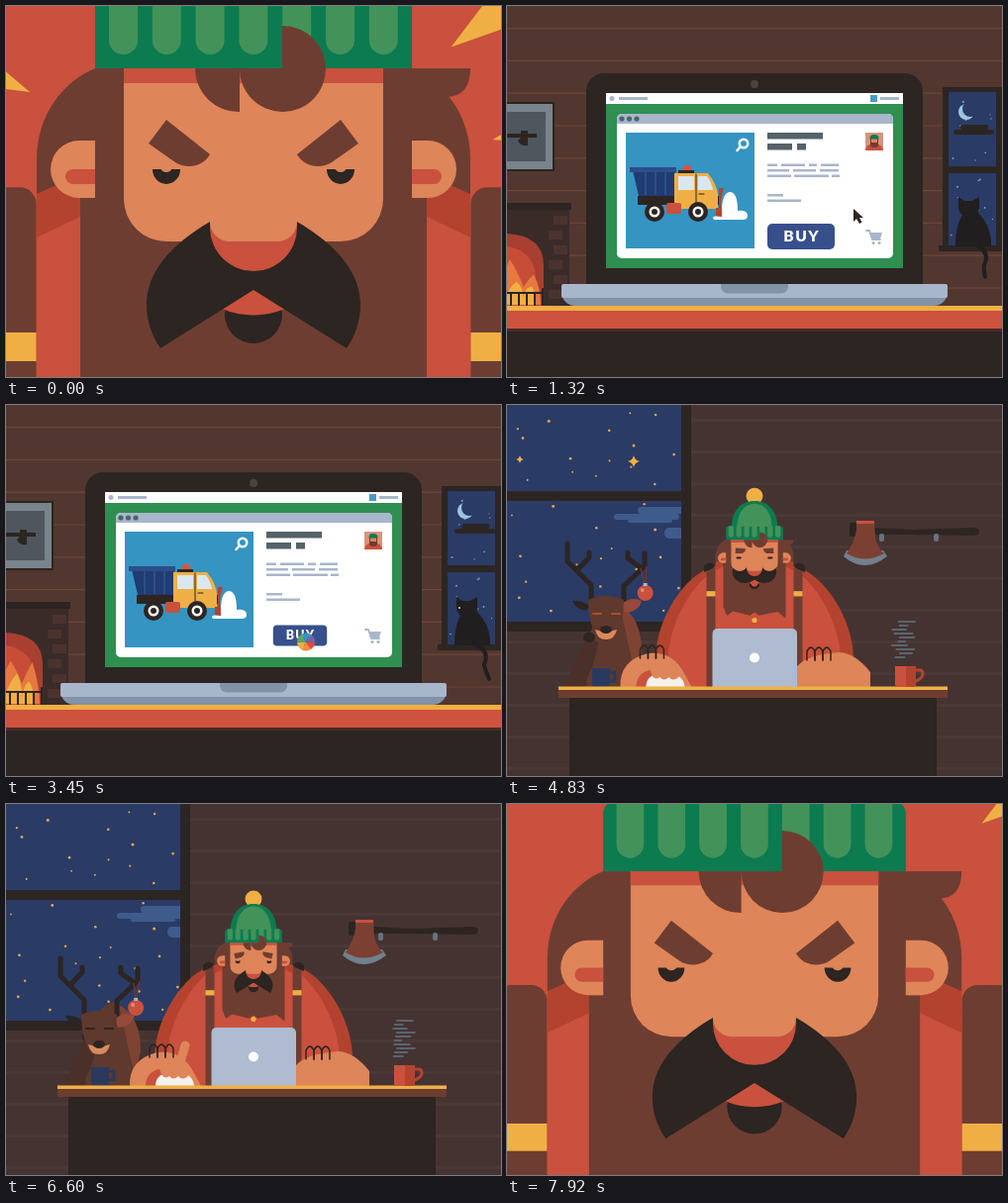
Animation, 500 px wide and 375 px high, one loop 7950 ms. Source, as an HTML page with a canvas:

```html
<!DOCTYPE html>
<html lang="en">
<head>
<meta charset="utf-8">
<title>Impatient lumberjack</title>
<style>
html, body { margin: 0; width: 100%; height: 100%; overflow: hidden; background: #2e2623; }
canvas { display: block; width: 100vw; height: 100vh; }
</style>
</head>
<body>
<canvas id="stage" width="500" height="375"></canvas>
<script>
const LOOP = 7950, STEP = 30, LAPTOP_AT = 1200, DESK_AT = 4290, ZOOM_AT = -219;
const g = document.getElementById('stage').getContext('2d');
const RED = '#c9513d', DARK_RED = '#b3432f', SKIN = '#de8559', HAIR = '#6e3d31', INK = '#2c2522',
  GOLD = '#f0af45', PINE = '#0c7b4f', GREEN = '#43925a', STEEL = '#a8b6cb', NAVY = '#2a3b66', WHITE = '#fff';

const fill = (c, d) => { g.fillStyle = c; g.fill(new Path2D(d)); };
const line = (c, w, d) => {
  g.strokeStyle = c; g.lineWidth = w; g.lineCap = g.lineJoin = 'round';
  g.stroke(new Path2D(d));
};
const box = (c, x, y, w, h, r = 0) => {
  g.fillStyle = c; g.beginPath(); g.roundRect(x, y, w, h, r); g.fill();
};
const dot = (c, x, y, r, ry = r) => {
  g.fillStyle = c; g.beginPath(); g.ellipse(x, y, r, ry, 0, 0, 7); g.fill();
};
const group = (draw, x = 0, y = 0, s = 1, a = 0) => {
  g.save(); g.translate(x, y); g.rotate(a); g.scale(s, s); draw(); g.restore();
};
const both = draw => {
  draw();
  g.save(); g.translate(500, 0); g.scale(-1, 1); draw(); g.restore();
};
// Smooth progress from 0 to 1 between two times
const ramp = (t, a, b) => {
  const p = Math.min(1, Math.max(0, (t - a) / (b - a)));
  return p * p * (3 - 2 * p);
};
const random = seed => () => (seed = seed * 16807 % 2147483647) / 2147483647;

// Stars scattered one per grid cell
function stars(seed, cols, rows, x, y, w, h, c, size) {
  const rnd = random(seed * 99991), cw = w / cols, ch = h / rows;
  for (let i = 0; i < cols * rows; i++)
    dot(c, x + (i % cols + rnd()) * cw, y + (Math.floor(i / cols) + rnd()) * ch, size * (.7 + .5 * rnd()));
}

// ---- Lumberjack ----
function eye(mood) {
  if (mood === 'happy') return line(INK, 11, 'M153 164H171');
  fill(INK, 'M148 165H176A14 15 0 0 1 148 165Z');
  fill(SKIN, 'M156 164H168Q166 168 162 168T156 164Z');
}

function brow(mood) {
  const shape = () => fill(HAIR, 'M-13 -24L31 11C24 24 7 26 -4 19L-31 0Z');
  if (mood === 'angry') group(shape, 175, 139);
  else if (mood === 'happy') group(shape, 168, 122, 1, -.6);
  else group(shape, 168, 130, 1, -.85);
}

function moustache(mood) {
  if (mood === 'happy')
    fill(INK, 'M206 218C185 250 150 245 132 222C112 262 150 312 200 306Q232 302 250 287' +
      'Q268 302 300 306C350 312 388 262 368 222C350 245 315 250 294 218Z');
  else
    fill(INK, 'M206 218C165 242 142 270 142 302C142 318 147 333 156 346L250 287L344 346' +
      'C353 333 358 318 358 302C358 270 335 242 294 218Z');
}

function head(mood) {
  both(() => {
    fill(HAIR, 'M120 63H90C58 76 31 110 31 155V190H120Z');
    fill(DARK_RED, 'M31 190L75 170V213L31 234Z');
  });
  fill(HAIR, 'M410 63H469Q469 92 444 92H410Z');
  fill(HAIR, 'M90 63H410V194H425V505L380 468L275 488L250 470L225 488L130 465L95 490L75 440V194H90Z');
  both(() => {
    box(SKIN, 45, 136, 45, 58, [29, 0, 0, 29]);
    box(RED, 60, 165, 30, 15, [7.5, 0, 0, 7.5]);
  });
  box(SKIN, 119, 63, 262, 175, [0, 0, 43, 43]);
  box(RED, 119, 63, 262, 15);

  dot(GOLD, 250, -182, 47);
  fill(PINE, 'M120 0C120 -100 175 -155 250 -155S380 -100 380 0Z');
  fill(GREEN, 'M152 0C152 -90 195 -140 250 -140S348 -90 348 0Z');
  box(PINE, 90, -12, 320, 75, [14, 14, 0, 0]);
  for (let i = 0; i < 7; i++) box(GREEN, 104 + i * 43.8, -14, 29, 63, [0, 0, 14.5, 14.5]);
  fill(HAIR, 'M191 63H236V107A44 44 0 0 1 191 63Z');
  fill(HAIR, 'M279 63V20A43.5 43.5 0 1 1 236 63Z');

  both(() => { brow(mood); eye(mood); });
  dot(INK, 250, 312, 29);
  fill(RED, 'M218 306L250 284L282 306Q250 319 218 306Z');
  if (mood === 'happy') fill(RED, 'M230 306H270Q266 326 250 326T230 306Z');
  moustache(mood);
  fill(RED, 'M206 214H294V224A44 44 0 0 1 206 224Z');
  box(SKIN, 206, 190, 88, 48, [0, 0, 20, 20]);
}

function armHair(x, y) {
  for (let i = 0; i < 3; i++)
    line(INK, 1.5, `M${x + i * 8} ${y + 13}V${y + 4}Q${x + i * 8 + 4} ${y - 4} ${x + i * 8 + 8} ${y + 4}V${y + 13}`);
}

function mouseArm(t) {
  const settle = ramp(t, 5100, 5700);
  const shift = 10 * settle + 2 * Math.sin(t / 260) * (1 - settle);
  const tap = t > 5700 ? .5 + .5 * Math.cos((t - 6600) / 300 * 2 * Math.PI) : 0;
  group(() => {
    fill(SKIN, 'M115 285Q114 258 143 251Q168 248 180 272L187 285Z');
    armHair(135, 243);
    fill(RED, 'M131 285Q131 270 148 267L152 273Q142 277 142 285Z');
    fill('#f4f1ee', 'M141 285Q141 271 160 271T180 285Z');
    fill(SKIN, 'M143 263Q158 258 172 269L174 275Q168 280 164 275Q159 280 155 275Q150 279 147 273Z');
    line(SKIN, 9, `M163 268Q167 ${266 - 7 * tap} 171 ${271 - 27 * tap}`);
  }, shift);
}

function man(t, mood, laugh) {
  fill(DARK_RED, 'M150 286V258C150 215 180 172 208 163H292C320 172 350 215 350 258V286Z');
  fill(RED, 'M163 286V258C163 222 186 182 209 167V163H291V167C314 182 337 222 337 258V286Z');
  both(() => {
    box(HAIR, 201.5, 161.8, 9, 124, [2, 3, 0, 0]);
    box(GOLD, 201.5, 188.2, 9, 5.2);
  });
  group(() => { g.translate(-250, -175); head(mood); }, 250, 160.3 + laugh, .18);
  dot(GOLD, 250, 217.5, 2.6);
  fill(SKIN, 'M293 286V264Q304 252 336 250Q352 251 367 270V286Z');
  armHair(303, 245);
  mouseArm(t);
  box('#aebbd0', 207.5, 226, 85.5, 60, [5, 5, 0, 0]);
  dot(WHITE, 250, 255.5, 5);
}

function desk() {
  box(INK, 63, 296, 371, 80);
  box(HAIR, 52, 287, 393, 9);
  box(GOLD, 52, 284.5, 393, 3.5);
}

// ---- Close-up ----
function closeUp(t, T) {
  const scale = (1.158 - .158 * Math.exp(-T / 120)) / .18;
  const tip = [247, 266, 279, 284][((T / STEP) % 4 + 4) % 4];
  box(RED, 0, 0, 500, 375);
  for (const a of [-.63, -.212, 3.558])
    group(() => fill(GOLD, `M${tip} 0L${tip + 150} -45V45Z`), 250, 187, 1, a);
  group(() => {
    g.translate(-250, -160.3);
    man(t, 'angry', 0);
    desk();
  }, 250, 160.3 + 14.7 * Math.min(1, (scale - 1) / 4), scale);
}

// ---- Cabin desk ----
function sparkle(t, x, y, size, at) {
  const r = size * Math.max(0, 1 - Math.abs(t - at) / 260);
  if (r) group(() => fill(GOLD, 'M0 -1Q.2 -.2 1 0Q.2 .2 0 1Q-.2 .2 -1 0Q-.2 -.2 0 -1Z'), x, y, r);
}

function nightWindow(t) {
  box(INK, 0, 0, 186, 229);
  box(NAVY, 0, 0, 176, 87);
  box(NAVY, 0, 97, 176, 122);
  stars(77, 5, 3, 2, 2, 172, 82, '#e0a64c', 1.3);
  stars(41, 5, 4, 2, 100, 172, 116, '#e0a64c', 1.3);
  sparkle(t, 128, 57, 6, 4830);
  sparkle(t, 13, 55, 4, 4850);
  sparkle(t, 35, 38, 5, 6150);
  sparkle(t, 51, 19, 5, 7000);
  g.save();
  g.beginPath(); g.rect(0, 97, 176, 122); g.clip();
  group(() => {
    box('#3f5b8c', 132, 103, 60, 7, 3.5);
    box('#3f5b8c', 108, 110, 66, 6, 3);
    box('#3f5b8c', 122, 115, 45, 4, 2);
    box('#3f5b8c', 159, 124, 40, 11, 5);
  }, (t - 4830) / 440);
  g.restore();
}

function deer(t) {
  const nod = ramp(t, 5250, 6000), fur = '#5f392d';
  fill(fur, 'M80 286L84 232Q90 206 108 200Q134 210 136 250L126 286Z');
  fill('#7f4333', 'M114 203Q136 214 136 250L130 274Q122 240 114 203Z');
  fill('#4b3029', 'M58 285L81 234L92 240Q89 264 76 285Z');
  dot(INK, 83, 235, 6, 5);
  group(() => {
    line(INK, 5, 'M85 197V182L61 158V140M83 149V154L71 167M118 197V183L139 163V150M122 149V155L136 165');
    fill(INK, 'M66 198Q74 197 84 203L80 208Q70 207 66 198Z');
    fill('#97493a', 'M116 201Q126 193 136 198Q133 209 119 210Z');
    fill(fur, 'M82 197Q100 189 118 197L117 212Q114 228 108 236Q100 241 92 236Q86 228 83 212Z');
    fill('#d88a5c', 'M89 227L100 230L111 227Q109 237 100 237T89 227Z');
    dot(INK, 100, 227, 6, 4);
    line(nod > .5 ? INK : '#b04b38', 2, 'M87 211H95M106 211H114');
    const sway = 2 * Math.sin(t / 230);
    line('#7a352b', 1.2, `M135 165L${138 + sway} 183L141 163`);
    dot(RED, 138 + sway, 190, 8);
    box(STEEL, 136 + sway, 180, 4, 3);
    dot('#e58670', 135 + sway, 187, 2);
  }, -6 * nod, 16 * nod);
  box('#2a3a5e', 86, 266, 18, 19, [0, 0, 3, 3]);
  line('#2a3a5e', 3, 'M104 270H109V279H104');
}

function axe() {
  box(INK, 346, 119, 10, 14, 2);
  fill(INK, 'M352 123L410 126L470 124Q477 124 477 128T470 132L410 131L352 131Z');
  fill('#70808d', 'M343 147L340 153Q361 171 384 153L380 147Z');
  fill('#7c4033', 'M353 117H371L372 134Q375 146 381 150Q361 161 343 150Q351 139 353 126Z');
  box(RED, 353, 117, 18, 3);
  box('#66727c', 376, 130, 5, 8, 2);
  box('#66727c', 431, 130, 5, 8, 2);
}

function cup(t) {
  for (let i = 0; i < 10; i++) {
    const x = 400 + 4 * Math.sin(i * 1.7 + t / 240), w = 3 + 6 * Math.abs(Math.sin(i * 2.3 + 1));
    line('#59656f', 2, `M${x - w} ${219 + i * 4}H${x + w}`);
  }
  box(RED, 392, 264, 21, 21, [0, 0, 3, 3]);
  box(DARK_RED, 403, 264, 10, 21, [0, 0, 3, 0]);
  line(DARK_RED, 3, 'M413 268H417Q420 268 420 272T413 279');
}

function cabin(t, T) {
  box('#453332', 0, 0, 500, 375);
  for (let y = 14; y < 375; y += 32) box('#4b3937', 0, y, 500, 3);
  nightWindow(t);
  axe();
  deer(t);
  const mood = t < 5400 ? 'happy' : T > -400 ? 'angry' : 'bored';
  const cheer = 1 - ramp(t, 5200, 5600);
  man(t, mood, cheer * (-3 + Math.sin(t / 60)));
  both(() => fill(INK, 'M199 169V163Q204 157 210 162L208 165Z'));
  desk();
  cup(t);
}

// ---- Laptop ----
function picture() {
  box(INK, 0, 97, 48, 70);
  box('#79838c', 0, 99, 46, 66);
  box('#4f565d', 0, 107, 39, 50);
  fill(INK, 'M0 129H14V126H21V141Q13 142 11 136L14 133H0ZM21 129H30V133H21Z');
}

function fireplace(t) {
  box('#3a2b29', 0, 205, 63, 100);
  box(INK, 0, 199, 65, 7);
  for (let i = 0; i < 6; i++) box('#4a332f', i % 2 ? 42 : 47, 212 + i * 15, 14, 9, 1);
  fill('#a93f31', 'M0 230Q37 232 37 262V303H0Z');
  fill('#c84d37', 'M0 243Q28 248 29 275V303H0Z');
  const flame = (c, x, w, h, p) => {
    const lean = 4 * Math.sin(t / 110 + p), top = 302 - h - 6 * Math.sin(t / 140 + p);
    fill(c, `M${x - w} 302Q${x - w} 285 ${x + lean} ${top}Q${x + w} 284 ${x + w} 302Z`);
  };
  flame('#e77840', 5, 15, 46, 0);
  flame('#e77840', 23, 11, 36, 2);
  flame(GOLD, 8, 9, 28, 1);
  flame(GOLD, 22, 6, 19, 3);
  line(INK, 2, 'M0 290H36M4 290V304M12 290V304M20 290V304M28 290V304M36 286V304');
}

function catWindow(t) {
  box(INK, 440, 82, 60, 164);
  box(NAVY, 446, 87, 48, 75);
  box(NAVY, 446, 169, 48, 74);
  stars(19, 3, 3, 448, 90, 44, 68, '#8795bb', .9);
  stars(53, 3, 3, 448, 172, 44, 60, '#8795bb', .9);
  dot('#9ec5de', 464, 107, 8);
  dot(NAVY, 468, 104, 8);
  const drift = (t - 2220) / 900;
  box(INK, 459 + drift, 120, 28, 5, 2.5);
  box(INK, 452 + drift, 125, 41, 5, 2.5);
  box(INK, 436, 242, 64, 6);

  const turn = ramp(t, 2700, 3100), swing = .5 - .5 * Math.cos((t - 2220) / 1230 * Math.PI);
  fill('#211e20', 'M453 243Q453 216 464 207H474Q490 222 489 243Z');
  group(() => {
    fill('#211e20', 'M456 193L462 197H470L477 193V205Q475 213 466 213T456 204Z');
    if (turn > .5) dot('#d3dce8', 459, 204, 1);
  }, -turn, turn);
  const mid = 478 + 5 * swing, end = 458 + 30 * swing;
  line('#211e20', 4, `M475 242Q${mid + 6} 250 ${mid} ${258 + 4 * swing}Q${mid - 7 * (1 - swing)} 265 ${end} ${257 + 20 * swing}`);
}

function truck() {
  fill('#203c70', 'M127 166H170V192H133Z');
  box('#2c4d8b', 124, 163, 47, 5);
  line('#2c4d8b', 2, 'M140 169V190M150 169V190M160 169V190');
  box(INK, 132, 192, 84, 9);
  fill(GOLD, 'M169 169H203Q212 180 213 191V205H169Z');
  fill('#d9e8ee', 'M173 172H189V186H173ZM193 172H202Q207 179 208 186H193Z');
  line(INK, 1, 'M191 170V203M194 190H199');
  box('#e0523d', 178, 161, 8, 5, [3, 3, 0, 0]);
  box(INK, 173, 166, 16, 3);
  box(RED, 161, 199, 15, 11, 2);
  for (const x of [149, 193]) {
    dot(INK, x, 208, 10);
    dot(WHITE, x, 208, 5.5);
    dot(INK, x, 208, 3);
  }
  fill(DARK_RED, 'M214 184H219Q213 198 219 214H211V204H214Z');
  fill(WHITE, 'M217 213Q216 189 225 188Q233 188 233 207Q243 206 243 212Q243 216 238 216H209Q205 211 217 213Z');
}

function shopPage(t) {
  box('#2f8f50', 100, 88, 300, 177);
  box(WHITE, 100, 88, 300, 11);
  dot(STEEL, 106, 93.5, 2.5);
  box(STEEL, 113, 92, 29, 3);
  box('#4a9bc4', 367, 90, 7, 7);
  box(STEEL, 377, 92, 19, 3);
  box(WHITE, 111, 109, 279, 146, 5);
  box(STEEL, 111, 109, 279, 10, [5, 5, 0, 0]);
  for (const x of [116, 123.5, 131]) dot('#4c636c', x, 114, 2.6);
  box('#3594c1', 120, 128, 130, 117);
  truck();
  dot(WHITE, 239, 139, 5.5);
  dot('#3594c1', 239, 139, 3);
  line(WHITE, 2.5, 'M235 143L232.5 146');

  const bars = (c, y, h, ...xs) => {
    for (let i = 0; i < xs.length; i += 2) box(c, xs[i], y, xs[i + 1] - xs[i], h);
  };
  bars('#566269', 128, 6.5, 263, 319);
  bars('#566269', 139, 6.5, 263, 288, 293, 302);
  bars(STEEL, 159.5, 2.5, 263, 273, 277, 301, 305, 313, 317, 335);
  bars(STEEL, 165, 2.5, 263, 285, 289, 312, 316, 335);
  bars(STEEL, 170.5, 2.5, 263, 287, 290, 325, 328, 336);
  bars(STEEL, 190, 2.5, 263, 279);
  bars(STEEL, 195.5, 2.5, 263, 297);

  box('#d9927d', 362, 128, 18, 18);
  fill(RED, 'M362 146Q363 139 371 139T380 146Z');
  box(HAIR, 367, 134, 8, 9, [0, 0, 3, 3]);
  box(SKIN, 368, 134, 6, 4);
  box(PINE, 366.5, 130, 9, 4.5, [4, 4, 0, 0]);

  group(() => {
    box('#37508c', -34, -13, 68, 26, 5);
    g.fillStyle = WHITE;
    g.font = '900 15.5px Lato, "Open Sans", sans-serif';
    g.letterSpacing = '1.5px';
    g.textAlign = 'center';
    g.textBaseline = 'middle';
    g.fillText('BUY', .7, .5);
  }, 297, 233, 1 - .2 * ramp(t, 2500, 2620));

  line(STEEL, 1.8, 'M363 227H366L369 236H377');
  fill(STEEL, 'M367 229H379L377 235H369Z');
  dot(STEEL, 370, 239.5, 1.6);
  dot(STEEL, 376, 239.5, 1.6);
}

function pointer(t) {
  if (t < 2640) {
    const p = ramp(t, 1500, 2100);
    return group(() => {
      const d = 'M0 0V13L3 10L6 15L8.5 13.5L6 9H10Z';
      line(WHITE, .8, d);
      fill(INK, d);
    }, 350 - 51 * p, 205 + 28 * p);
  }
  const hues = ['#e14c3c', '#ef8c3e', GOLD, '#55a85c', '#3594c1', '#7b63a8'];
  group(() => hues.forEach((c, i) => {
    g.fillStyle = c;
    g.beginPath(); g.moveTo(0, 0);
    g.arc(0, 0, 9, i * Math.PI / 3, (i + 1) * Math.PI / 3);
    g.fill();
  }), 303, 239.5, 1, (t - 3450) / 130);
}

function laptop(t) {
  box('#51372f', 0, 0, 500, 375);
  for (let y = 22; y < 303; y += 32.8) box('#70443a', 0, y, 500, 1.2);
  picture();
  fireplace(t);
  catWindow(t);
  box(INK, 0, 303, 500, 72);
  box(GOLD, 0, 303, 500, 5);
  box('#cd533e', 0, 308, 500, 18);
  box('#482c27', 0, 326, 500, 3);
  box(INK, 80, 68, 340, 216, [18, 18, 0, 0]);
  dot('#4a4441', 250, 79, 4);
  shopPage(t);
  pointer(t);
  box('#8292a7', 55, 282, 390, 21, [2, 2, 14, 14]);
  box(STEEL, 55, 281, 390, 14, 2);
  box('#8292a7', 216, 281, 68, 9.5, [0, 0, 7, 7]);
}

function draw(now) {
  const t = Math.floor(now % LOOP / STEP) * STEP;
  const T = t < DESK_AT ? t : t - LOOP;
  if (T >= ZOOM_AT && T < LAPTOP_AT) closeUp(t, T);
  else if (T >= LAPTOP_AT) laptop(t);
  else cabin(t, T);
}

const start = performance.now();
(function tick() {
  draw(performance.now() - start);
  requestAnimationFrame(tick);
})();
</script>
</body>
</html>
```
